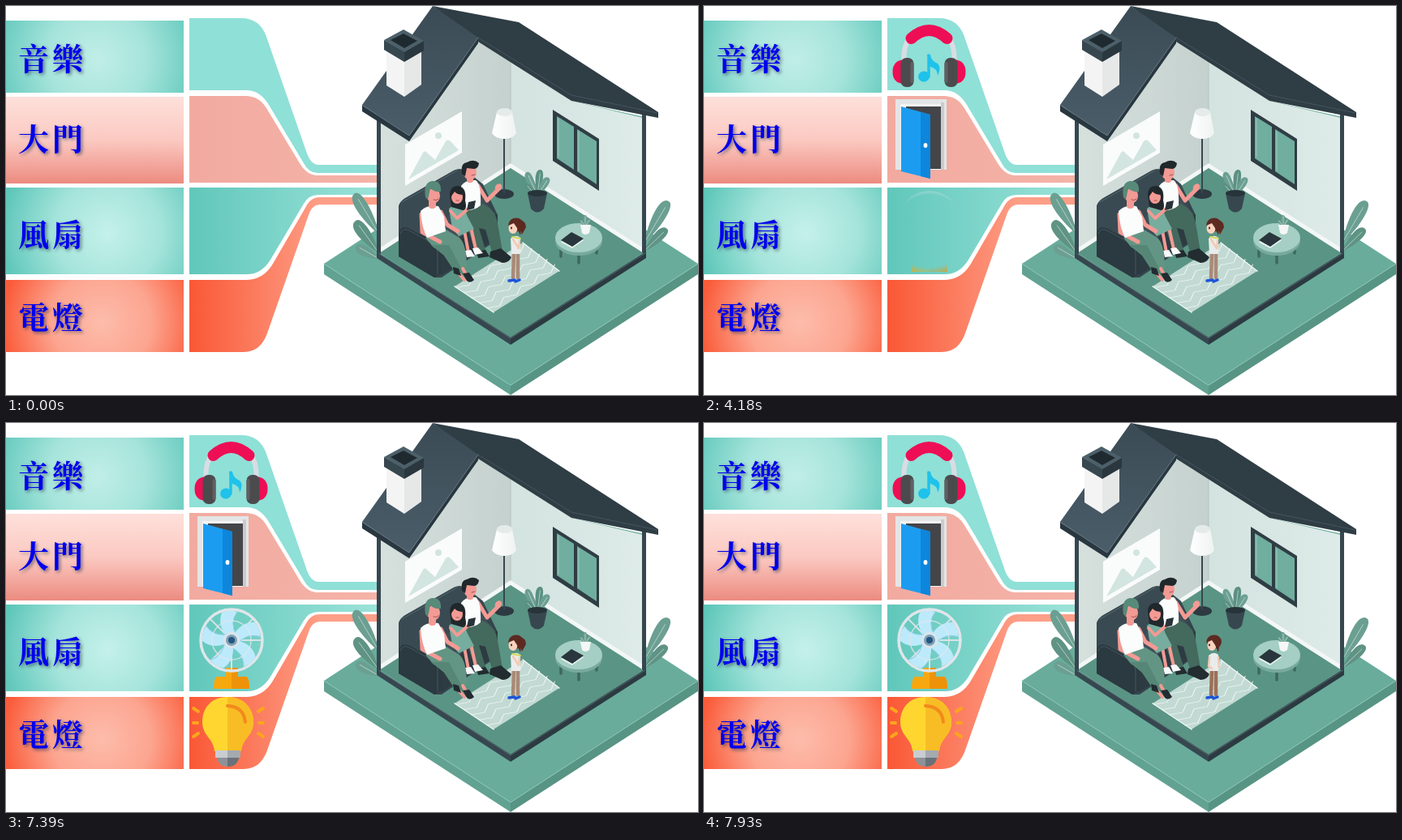
An HTML page with a canvas that plays this animation: 853x480 px, repeating every 7.99 s.

```html
<!DOCTYPE html>
<html lang="zh-Hant">
<head>
<meta charset="utf-8">
<title>智慧家庭</title>
<style>
html, body { margin: 0; width: 100%; height: 100%; overflow: hidden; background: #fff; }
canvas { display: block; width: 100vw; height: 100vh; }
</style>
</head>
<body>
<canvas id="stage" width="853" height="480"></canvas>
<script>
const W = 853, H = 480, LOOP = 7990, STEP = 60;
const stage = document.getElementById('stage').getContext('2d');
const DARK = '#37474f', SKIN = '#f39a94', HAIR = '#20282c';
let g;

function layer(draw) {
  const c = document.createElement('canvas');
  c.width = W; c.height = H;
  g = c.getContext('2d');
  g.lineCap = g.lineJoin = 'round';
  draw();
  return c;
}
function fill(color, d) {
  g.fillStyle = color;
  g.fill(new Path2D(d));
}
function line(color, width, d) {
  g.strokeStyle = color;
  g.lineWidth = width;
  g.stroke(new Path2D(d));
}
function oval(color, x, y, rx, ry = rx, turn = 0) {
  g.fillStyle = color;
  g.beginPath();
  g.ellipse(x, y, rx, ry, turn, 0, 7);
  g.fill();
}
function box(color, x, y, w, h, r = 0) {
  g.fillStyle = color;
  g.beginPath();
  g.roundRect(x, y, w, h, r);
  g.fill();
}
function shade(grad, ...colors) {
  colors.forEach((c, i) => grad.addColorStop(i / (colors.length - 1), c));
  return grad;
}
const across = (x0, x1, ...c) => shade(g.createLinearGradient(x0, 0, x1, 0), ...c);
const down = (y0, y1, ...c) => shade(g.createLinearGradient(0, y0, 0, y1), ...c);
const glow = (x, y, r, ...c) => shade(g.createRadialGradient(x, y, 0, x, y, r), ...c);

function leaf(x, y, tx, ty, w, color = '#6b9f91', vein = '#b9d6cd') {
  const len = Math.hypot(tx - x, ty - y);
  g.save();
  g.translate(x, y);
  g.rotate(Math.atan2(ty - y, tx - x));
  fill(color, `M0 0C${len * .3} ${-w * .7} ${len} ${-w * 1.5} ${len} 0C${len} ${w * 1.1} ${len * .3} ${w * .7} 0 0Z`);
  line(vein, .8, `M0 0L${len * .85} 0`);
  g.restore();
}

function panels() {
  g.fillStyle = '#fff';
  g.fillRect(0, 0, W, H);
  box(glow(112, 66, 122, '#c0eee7', '#a6e4db', '#68cbbf'), 0, 18, 219, 89);
  box(down(112, 219, '#fee0db', '#fbc9c1', '#ec8b80'), 0, 112, 219, 107);
  box(glow(125, 280, 130, '#c4f1ea', '#a5e4db', '#5fc7ba'), 0, 224, 219, 107);
  box(glow(118, 390, 122, '#fdbcab', '#fca590', '#fa5c3a'), 0, 338, 219, 89);

  fill('#8fe0d7', 'M226 15H290Q313 15 321 38L371 182Q376 196 386 196H541V206H384Q373 206 367 194L324 122Q313 104 297 104H226Z');
  fill(across(226, 460, '#f2aaa0', '#f5b3a8'), 'M226 111H295Q312 111 321 126L362 194Q371 209 384 209H541V218H226Z');
  fill(across(226, 450, '#61c7bb', '#9ae2d8'), 'M226 224H541V233H385Q373 233 367 244L326 313Q315 331 297 331H226Z');
  fill(across(226, 390, '#fa5835', '#fd9f88'), 'M226 338H297Q318 337 329 318L369 249Q375 236 387 236H541V245H388Q377 245 373 258L323 401Q315 427 293 427H226Z');

  g.font = '600 38px "Noto Serif CJK TC", "Noto Sans CJK TC", "Noto Sans CJK", serif';
  g.letterSpacing = '4px';
  g.fillStyle = '#0000ee';
  g.shadowColor = 'rgba(30,40,70,.6)';
  g.shadowBlur = 4;
  g.shadowOffsetX = g.shadowOffsetY = 2;
  [['音樂', 79], ['大門', 178], ['風扇', 296], ['電燈', 398]].forEach(([s, y]) => g.fillText(s, 15, y));
}

function platform() {
  fill('#69ac9c', 'M392 318L622 168L853 318L622 468Z');
  fill('#62a292', 'M392 318L622 468V480L392 331Z');
  fill('#579483', 'M853 318L622 468V480L853 331Z');
  line('#8ac5b6', 1, 'M392 318L622 468L853 318');
  leaf(460, 282, 430, 231, 10);
  leaf(459, 304, 431, 265, 10, '#5f9384');
  leaf(460, 312, 432, 296, 8);
  leaf(787, 292, 817, 241, 10);
  leaf(787, 302, 815, 275, 8, '#5f9384');
}

// Solid backing, seen only while the house is translucent.
function hull() {
  fill('#69ac9c', 'M458 138L497 166L582 44L697 117L787 137V304L622 411L458 304Z');
  fill('#6f8a86', 'M457 116H489V286L457 308Z');
}

function room() {
  fill(across(460, 622, '#d6e1de', '#c5d1ce'), 'M460 138L497 166L582 44L622 68V198L460 304Z');
  fill(across(622, 785, '#d3e3df', '#deebe8'), 'M622 68L697 117L785 138V304L622 198Z');
  fill('#5a9484', 'M622 198L786 304L622 411L460 304Z');
  fill('#f3f7f6', 'M622 194L786 299V305L622 200L460 305V299Z');
  line('#b5c2c0', 1, 'M622 70V194');

  // picture
  fill('#fafcfb', 'M492 171L562 130V181L492 222Z');
  fill('#d3e5e0', 'M496 214L514 181Q517 177 520 182L529 190L542 167Q545 163 549 168L558 178Z');
  oval('#d3e5e0', 533, 160, 4);

  // window
  fill('#2f3d44', 'M674 128L731 164V228L674 191Z');
  fill('#70ae9f', 'M679 136L700 149V202L679 188Z');
  fill('#70ae9f', 'M704 152L728 167V220L704 204Z');
  line('#98cabd', 1, 'M681 139V186M706 155V203');
}

function fittings() {
  // lamp
  oval('#2d3a41', 614, 232, 12, 6);
  line(DARK, 2, 'M614 160V230');
  fill(across(599, 630, '#ffffff', '#eef2f1'), 'M605 131L599 157Q604 164 614 164Q625 164 629 157L624 131Z');
  oval('#e5ebe9', 614.5, 131, 9.5, 5);

  // rug
  fill('#c2dad3', 'M553 346L637 292L682 327L601 378Z');
  g.save();
  g.transform(84, -54, 47, 32, 553, 346);
  for (let r = 0; r < 5; r++) {
    let d = '';
    for (let i = 0; i <= 8; i++) d += `${i ? 'L' : 'M'}${i / 8} ${(r + .2 + (i % 2) * .6) / 5}`;
    line('#f2f8f6', .012, d);
  }
  g.restore();
  line('#eef6f3', 1.5, 'M553 346L601 378M637 292L682 327');

  // pot plant
  leaf(655, 234, 642, 205, 6, '#6b9f91');
  leaf(655, 234, 659, 202, 6, '#5b9080');
  leaf(655, 234, 669, 212, 6, '#6b9f91');
  leaf(654, 235, 641, 220, 5, '#5b9080');
  fill(DARK, 'M643 231H667L663 250Q655 259 647 250Z');
  oval('#27343a', 655, 231, 12, 4);

  // table
  line('#3f685d', 3.5, 'M684 296V309M706 305V317M728 296V305');
  oval('#78aa9c', 706, 290, 29, 18);
  oval('#a5cfc4', 706, 286, 29, 18);
  fill('#29363d', 'M684 289L697 279L712 287L698 297Z');
  line('#eef4f2', 1.5, 'M685 291L698 298L711 289');
  leaf(714, 272, 714, 258, 3);
  leaf(714, 272, 708, 264, 2.5);
  leaf(714, 272, 720, 263, 2.5);
  fill('#f4f7f6', 'M708 270H721L719 280Q714 284 710 280Z');
}

function sofa() {
  fill('#36454d', 'M484 247Q486 240 494 236L552 203Q560 199 568 204L588 220L606 258V288L537 335L528 335L484 309Z');
}

function cushions() {
  fill('#3a4a52', 'M484 247Q486 240 494 236L552 203Q560 199 568 204L588 220L600 258L532 302L486 284Z');
  fill('#2d3b42', 'M508 282L588 238L606 258V286L537 332Z');
  fill('#414f58', 'M508 280L586 236L604 257L540 298Z');
  line('#53656d', 1, 'M488 242L556 203');
  fill('#2b3940', 'M484 283Q485 269 498 275L526 290Q537 295 537 306V330L528 335L484 309Z');
  line('#46565e', 1, 'M486 281Q489 272 499 278L524 292Q532 296 532 306V331');
}

function family() {
  // father
  fill('#44695d', 'M562 250L584 243Q603 249 606 268L612 303L600 307L591 276L583 274L592 304L580 308L570 277Z');
  fill('#222c31', 'M597 303L610 299L623 310Q620 317 612 317L596 310ZM580 303L591 301L596 309L582 311Z');
  line(SKIN, 5, 'M582 222L593 240L606 227');
  oval(SKIN, 607, 224, 4, 5, .6);
  fill('#fbfcfc', 'M561 222Q566 214 579 215Q586 220 585 246Q576 254 564 251Z');
  box(SKIN, 568, 208, 8, 10, 3);
  oval(SKIN, 572, 205, 8, 10);
  fill(HAIR, 'M562 207Q560 194 568 193Q577 188 583 194Q582 201 577 201L568 200L566 210Z');

  // daughter on the sofa
  line(SKIN, 4, 'M565 277L570 304M573 273L579 300');
  fill('#f7f9f9', 'M566 302L573 301L578 309L568 310ZM575 299L582 298L588 305L578 307Z');
  fill('#76ad9e', 'M546 250Q554 243 564 247L569 260L577 275L558 284L550 274Z');
  fill(HAIR, 'M547 232Q548 221 558 222Q568 224 566 240Q569 252 563 252L549 248Z');
  oval(SKIN, 556, 236, 7, 8);
  fill(HAIR, 'M548 236Q547 225 556 224Q564 224 564 233Q556 233 553 229Z');
  line(SKIN, 4, 'M548 253L556 262L571 249');
  fill('#263238', 'M570 242L579 240L577 250L568 252Z');

  // mother
  fill('#639584', 'M517 286L541 275L559 286Q568 294 568 324L559 327L551 305L527 298Z');
  fill('#568776', 'M524 295L546 295L565 331L557 334L540 308Z');
  line(SKIN, 4, 'M563 324L568 333M559 331L565 338');
  fill('#222c31', 'M563 330L571 329L577 338Q572 343 568 339ZM551 322L558 324L561 333L552 330Z');
  line(SKIN, 5, 'M536 254L544 270L557 278M512 257L513 279L535 291');
  fill('#fbfcfc', 'M511 253Q519 245 533 247L540 260L542 278L519 286Q512 272 511 253Z');
  box(SKIN, 521, 238, 9, 12, 4);
  oval(SKIN, 527, 234, 8, 9.5);
  fill('#588a79', 'M517 236Q514 218 525 216Q537 215 536 229Q528 230 523 225L520 239Z');
  line('#8b4446', .8, 'M527 239Q530 241 533 238M574 209L578 208M555 240L558 240');
}

function posts() {
  fill(DARK, 'M457 116H462V306L457 310ZM784 122H789V308L784 304Z');
  fill(DARK, 'M457 304L622 409V418L457 311Z');
  fill('#2c3a41', 'M789 303L622 409V418L789 311Z');
  line('#52656e', 1, 'M459 305L622 410L788 305');
}

function roof() {
  fill('#2f3d45', 'M526 0L632 20L804 131V138L697 117L582 44Z');
  line('#45555e', 1, 'M582 39L697 110L803 132');
  fill('#293740', 'M439 122L497 160L582 38V46L497 167L439 130Z');
  fill(down(0, 160, '#3b4b55', '#4a5d69'), 'M526 0L582 39L497 160L439 122Z');
  line('#64757f', 1, 'M440 123L497 160L582 39');
}

function chimney() {
  fill('#f4f4f4', 'M469 54L491 67V112L469 98Z');
  fill('#e6e8e8', 'M491 67L512 55V97L491 112Z');
  fill(DARK, 'M466 42L491 56V69L466 54Z');
  fill('#2a373e', 'M515 43L491 56V69L515 55Z');
  fill('#4d606a', 'M466 42L490 29L515 43L491 57Z');
  fill('#1f2a30', 'M474 42L490 34L507 43L491 52Z');
}

function visitor(turned) {
  line(turned ? '#9c705a' : '#a98a78', 4.5, 'M626 305L625 335M631 305L631 335');
  line('#1d55d8', 3.5, 'M620 339L627 338M628 340L633 338');
  fill('#e9ecec', 'M622 287Q628 281 634 286L634 306H623Z');
  if (turned) {
    line('#f4c9b0', 2.5, 'M623 289L622 300L626 303M634 289L635 302');
  } else {
    line('#f4c9b0', 2.5, 'M633 290L632 299L625 288');
    line('#d2d95c', 2, 'M624 285L634 287');
    fill('#5d2a22', 'M633 264Q641 265 641 273L636 282Q634 274 631 271Z');
  }
  oval('#5d2a22', 629, 270, 9, 8.5);
  oval('#f9d3bd', turned ? 626 : 625, 274, 5.5, 7);
  fill('#5d2a22', 'M619 271Q620 261 630 262L636 270L634 283L630 274L626 268Z');
  oval('#2b1a18', 623, 274, .9, 1.4);
}

function headphones() {
  for (const s of [1, -1]) {
    g.save();
    g.translate(277.5, 0);
    g.scale(s, 1);
    line('#d8dde3', 6, 'M-26 42Q-32 53 -31 69');
    fill('#ee0e55', 'M-30 66Q-45 67 -45 81Q-45 96 -30 96Z');
    box('#4b4b4d', -35, 64, 16, 36, 7);
    box('#606064', -23, 69, 4, 26, 2);
    g.restore();
  }
  line('#ee0e55', 14, 'M255.5 40Q277.5 20 299.5 40');
  oval('#1fc2ea', 271, 87, 7, 6.5, -.3);
  line('#1fc2ea', 3.5, 'M277 87V61');
  fill('#1fc2ea', 'M275 60H279Q280 68 288 71Q293 76 288 86Q288 77 279 75Z');
}

function door() {
  box('#e3e5e6', 236, 115, 63, 87);
  box('#c9cccf', 292, 119, 4, 83);
  box('#f5f5f5', 242, 121, 50, 81);
  box('#444548', 249, 124, 43, 77);
  fill('#1c9cf0', 'M243 124L279 134V213L243 204Z');
  fill('#0d86dc', 'M267 131L279 134V213L267 210Z');
  oval('#ffffff', 273, 172, 2.4, 3);
}

function fan() {
  fill('#f7a80f', 'M271 302H286V313H296Q300 314 300 328H256Q256 314 260 313H271Z');
  fill('#ee920a', 'M278 302H286V313H296Q300 314 300 328H278Z');
  g.save();
  g.translate(278, 268);
  for (let i = 0; i < 8; i++) {
    g.rotate(Math.PI / 4);
    line('#d9e2e8', 2, 'M0 0V-38');
  }
  for (let i = 0; i < 5; i++) {
    fill('#bdeafb', 'M-5 -4Q-18 -18 -12 -34Q-3 -38 7 -35Q-3 -22 6 -6Z');
    line('#8fcfe9', 1, 'M6 -6Q-3 -22 7 -35');
    g.rotate(Math.PI * .4);
  }
  line('#dfe6eb', 3.5, 'M-38 0A38 38 0 1 1 38 0A38 38 0 1 1 -38 0');
  line('rgba(222,231,238,.8)', 1.5, 'M-24 0A24 24 0 1 1 24 0A24 24 0 1 1 -24 0');
  oval('#dce5ea', 0, 0, 10);
  oval('#7ea1b8', 0, 0, 7);
  oval('#24567e', 0, 0, 4);
  g.restore();
}

function bulb() {
  fill('#ffd62f', 'M273 338C253 338 242 352 242 369C242 386 256 389 257 405H290C291 389 305 386 305 369C305 352 293 338 273 338Z');
  fill('#f8bd25', 'M273 338C293 338 305 352 305 369C305 386 291 389 290 405H273Z');
  line('#f28a1c', 4, 'M273 349Q293 350 295 369');
  fill('#c9cdd1', 'M258 404H289V413H258Z');
  fill('#a4aab0', 'M273 404H289V413H273Z');
  fill('#8c9298', 'M260 413H287Q285 424 273 424Q262 424 260 413Z');
  fill('#6a7178', 'M273 413H287Q285 424 273 424Z');
  line('#fba51e', 4, 'M231 352L237 356M231 370H236M231 387L237 383M317 352L311 356M317 370H312M317 387L311 383');
}

const back = layer(panels);
const house = [platform, hull, room, fittings, sofa, cushions, family, posts, roof, chimney].map(layer);
const guest = [false, true].map(turned => layer(() => visitor(turned)));
const icons = [
  { start: 400, steps: 25, x: 277.5, y: 62, r: 61, draw: headphones },
  { start: 2100, steps: 28, x: 267, y: 164.5, r: 65, draw: door },
  { start: 4120, steps: 25, x: 278, y: 278, r: 64, draw: fan },
  { start: 5890, steps: 25, x: 273.5, y: 381, r: 64, draw: bulb }
].map(o => ({ ...o, art: layer(o.draw) }));
const scratch = layer(() => {});
const veil = scratch.getContext('2d');

// A soft-edged hole closes over each icon.
function reveal(icon, t) {
  if (t < icon.start) return;
  const p = (Math.floor((t - icon.start) / STEP) + 1) / icon.steps;
  if (p >= 1) return stage.drawImage(icon.art, 0, 0);
  const r = icon.r * (1 - p);
  veil.globalCompositeOperation = 'copy';
  veil.drawImage(icon.art, 0, 0);
  veil.globalCompositeOperation = 'destination-out';
  const hole = veil.createRadialGradient(icon.x, icon.y, Math.max(0, r - 14), icon.x, icon.y, r);
  hole.addColorStop(0, `rgba(0,0,0,${Math.min(1, r / 14)})`);
  hole.addColorStop(1, 'rgba(0,0,0,0)');
  veil.fillStyle = hole;
  veil.fillRect(0, 0, W, H);
  stage.drawImage(scratch, 0, 0);
}

// The house swells to 105% while each of its parts fades to half, then returns.
function pulse(t) {
  const now = 7390 + Math.floor((t - 7390) / STEP) * STEP;
  const p = Math.min(1, Math.max(0, (now - 7399) / 450));
  const fade = Math.min(1, p / .2, (1 - p) / .2);
  const scale = 1 + .05 * (1 - Math.abs(2 * p - 1));
  stage.save();
  stage.globalAlpha = 1 - .5 * fade;
  stage.translate(622, 240);
  stage.scale(scale, scale);
  house.forEach(part => stage.drawImage(part, -622, -240));
  stage.restore();
}

function frame() {
  const t = performance.now() % LOOP;
  stage.drawImage(back, 0, 0);
  icons.forEach(icon => reveal(icon, t));
  pulse(t);
  stage.drawImage(guest[t >= 7570 ? 1 : 0], 0, 0);
  requestAnimationFrame(frame);
}
frame();
</script>
</body>
</html>
```
